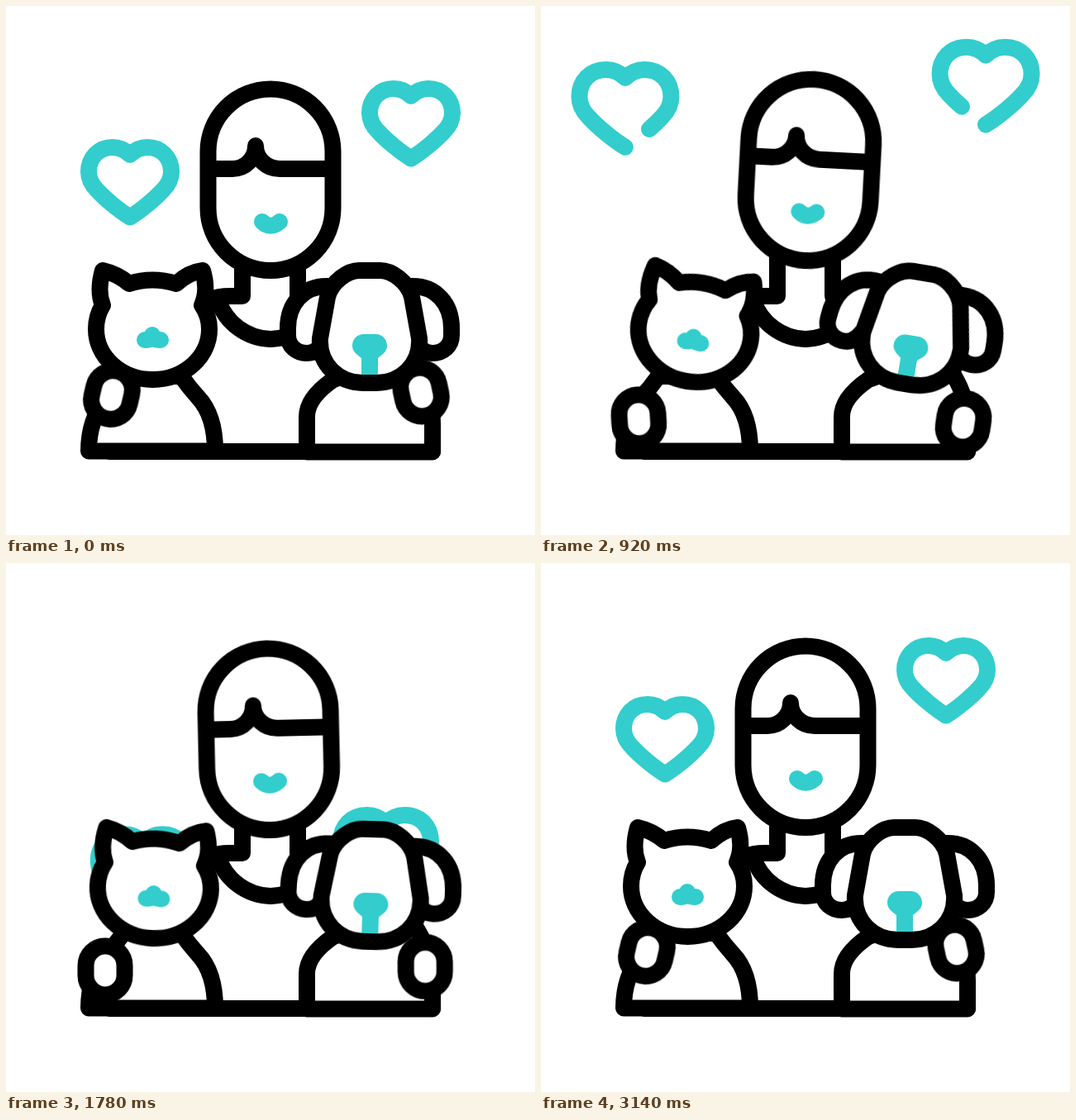
An HTML page for the animation above (3.6 s loop, 640x640 px).

```html
<!DOCTYPE html>
<html lang="en">
<head>
<meta charset="utf-8">
<title>Person with pets</title>
<style>
  @property --s { syntax: "<number>"; inherits: true; initial-value: 1; }

  html, body { margin: 0; width: 100%; height: 100%; overflow: hidden; background: #fff; }
  svg { display: block; width: 100vw; height: 100vh; }

  :root { --sine: cubic-bezier(.37, 0, .63, 1); }
  .ink { stroke: #000; stroke-width: 20; stroke-linecap: round; stroke-linejoin: round; fill: #fff; }
  .open { fill: none; }
  .teal { fill: #33cdcd; stroke: none; }
  .tealLine { fill: none; stroke: #33cdcd; }

  .face, .cat, .dog, .ear, .hand, .heart { animation: 3.6s var(--sine) infinite; }
  .face { transform-origin: 320px 305px; animation-name: face; }
  .cat { transform-origin: 177px 443px; animation-name: cat; }
  .dog { transform-origin: 440px 456px; animation-name: dog; }
  .ear.left { transform-origin: 386px 345px; animation-name: earLeft; }
  .ear.right { transform-origin: 494px 345px; animation-name: earRight; }
  .hand.left { animation-name: handLeft; }
  .hand.right { animation-name: handRight; }

  .heart { --m: 1; }
  .heart.left { animation-name: flyLeft, pulse; }
  .heart.right { --m: -1; animation-name: flyRight, pulse; }
  .heart path {
    fill: none; stroke: #33cdcd; stroke-linecap: round; stroke-linejoin: round;
    stroke-width: calc(20px / var(--s));
    stroke-dasharray: 1 2;
    transform: scale(calc(var(--s) * var(--m)), var(--s));
    animation: trim 3.6s linear infinite;
  }

  @keyframes face {
    0%, 64%, 100% { transform: translateY(0) rotate(0deg); }
    16.1% { transform: translateY(10.5px) rotate(-5.2deg); }
    25.6% { transform: translateY(-12px) rotate(3deg); }
    35.6% { transform: translateY(6px) rotate(.8deg); }
    49.4% { transform: translateY(3px) rotate(-1.3deg); }
  }
  @keyframes cat {
    0%, 61.1%, 100% { transform: translateY(0) rotate(0deg); }
    16.1% { transform: translateY(8px) rotate(-11deg); }
    25.6% { transform: translateY(2px) rotate(9.5deg); }
    35.6% { transform: translateY(14px) rotate(-7deg); }
    47.2% { transform: translateY(2.2px) rotate(2.2deg); }
  }
  @keyframes dog {
    0%, 61.1%, 100% { transform: translateY(0) rotate(0deg); }
    16.1% { transform: translateY(7px) rotate(-14deg); }
    25.6% { transform: translateY(1px) rotate(9.5deg); }
    35.6% { transform: translateY(13.5px) rotate(-6.5deg); }
    47.2% { transform: translateY(2.2px) rotate(1.9deg); }
  }
  @keyframes earLeft {
    0%, 61.1%, 100% { transform: rotate(0deg); }
    16.1% { transform: rotate(-9deg); }
    25.6% { transform: rotate(6deg); }
    35.6% { transform: rotate(-3deg); }
    47.2% { transform: rotate(1.5deg); }
  }
  @keyframes earRight {
    0%, 25.6%, 100% { transform: rotate(0deg); }
    16.1% { transform: rotate(-5deg); }
  }
  @keyframes handLeft {
    0%, 5.6%, 68%, 100% { transform: translate(128px, 470.5px) rotate(13deg); }
    36.8% { transform: translate(114.5px, 511.5px) rotate(-10deg); animation-timing-function: cubic-bezier(.4, 0, .7, .7); }
    49.4% { transform: translate(120px, 493px) rotate(0deg); animation-timing-function: cubic-bezier(.3, .3, .6, 1); }
  }
  @keyframes handRight {
    0%, 68%, 100% { transform: translate(502px, 467px) rotate(-12deg); }
    32% { transform: translate(512px, 508px) rotate(10.5deg); }
  }
  @keyframes flyLeft {
    0%, 81.94%, 100% { translate: 150px 213.5px; }
    44.17% { translate: 73px 70.5px; }
    44.18% { translate: 167px 382.5px; }
  }
  @keyframes flyRight {
    0%, 81.94%, 100% { translate: 490px 142.5px; }
    44.17% { translate: 567px 69.5px; }
    44.18% { translate: 458px 361.5px; }
  }
  @keyframes pulse {
    0%, 87.2%, 100% { --s: 1; }
    16.1% { --s: 1.12; }
    25.6% { --s: 1.11; }
    35.6%, 44.17% { --s: 1.14; }
    44.18% { --s: .92; }
    49.4% { --s: 1.09; }
    72.2% { --s: 1.16; }
    76.1% { --s: 1.3; }
  }
  @keyframes trim {
    0%, 23.25% { stroke-dashoffset: 0; }
    44.17% { stroke-dashoffset: 1; }
    44.18%, 100% { stroke-dashoffset: 0; }
  }
</style>
</head>
<body>
<svg viewBox="0 0 640 640">
  <defs>
    <path id="ear" d="M410 339H388C360 339 341 360 341 390V398C341 412 352 420 364 420C374 420 380 414 384 405L410 400Z"/>
  </defs>

  <g class="heart left"><path pathLength="1" d="M0 42C-13 34 -30 20 -40 9C-47 2 -50 -5 -50 -13C-50 -30 -38 -42.5 -21 -42.5C-13 -42.5 -6 -39.5 0 -33.5C6 -39.5 13 -42.5 21 -42.5C38 -42.5 50 -30 50 -13C50 -5 47 2 40 9C30 20 13 34 0 42"/></g>
  <g class="heart right"><path pathLength="1" d="M0 42C-13 34 -30 20 -40 9C-47 2 -50 -5 -50 -13C-50 -30 -38 -42.5 -21 -42.5C-13 -42.5 -6 -39.5 0 -33.5C6 -39.5 13 -42.5 21 -42.5C38 -42.5 50 -30 50 -13C50 -5 47 2 40 9C30 20 13 34 0 42"/></g>

  <g class="ink">
    <!-- torso -->
    <path stroke="none" d="M228 362Q250 351 272 351H286V290H353V351H368L408 362V539H228Z"/>
    <path class="open" d="M286 290V351H272Q248 351 228 362M353 290V351H368Q382 351 395 357"/>
    <path class="open" d="M257 357A69 69 0 0 0 320 403A69 69 0 0 0 383 357"/>
    <path class="open" d="M125 539H516"/>

    <g class="face">
      <rect x="244.5" y="100.5" width="151" height="219.5" rx="75.5"/>
      <path class="open" d="M245 197H274A28 28 0 0 0 302 169A29 28 0 0 0 331 197H395"/>
      <path class="tealLine" d="M310 261Q320 270.5 331 261"/>
    </g>

    <path d="M142 448Q132 462 122 473Q100 500 100 538.5H253Q253 495 232 473Q222 462 212 448Z"/>
    <path d="M396 452Q364 474 364 497V539.5H516V505Q516 475 500 448L484 420Z"/>

    <g class="cat">
      <path d="M117 362Q110 345 117 320Q135 324 149 336Q177 327 206 336Q221 322 238 320Q245 344 237 362Q246 375 246 391A68.5 61 0 0 1 109 391Q109 375 117 362Z"/>
      <path class="tealLine" d="M168 404Q177 404 177 398Q177 404 187 404"/>
    </g>

    <g class="dog">
      <g class="ear left"><use href="#ear"/></g>
      <g class="ear right"><use href="#ear" transform="matrix(-1 0 0 1 880 0)"/></g>
      <path d="M427 320H453C466 320 486 333 491 352L500 402C502 434 477 456 448 456H432C403 456 378 434 380 402L389 352C394 333 414 320 427 320Z"/>
      <path class="teal" d="M433 397H447C456 397 461 404 461 411C461 418 456 421 450 426V446H430V426C424 421 419 418 419 411C419 404 424 397 433 397Z"/>
    </g>

    <rect class="hand left" x="-23.5" y="-29.5" width="47" height="59" rx="23.5"/>
    <rect class="hand right" x="-23.5" y="-29.5" width="47" height="59" rx="23.5"/>
  </g>
</svg>
</body>
</html>
```
